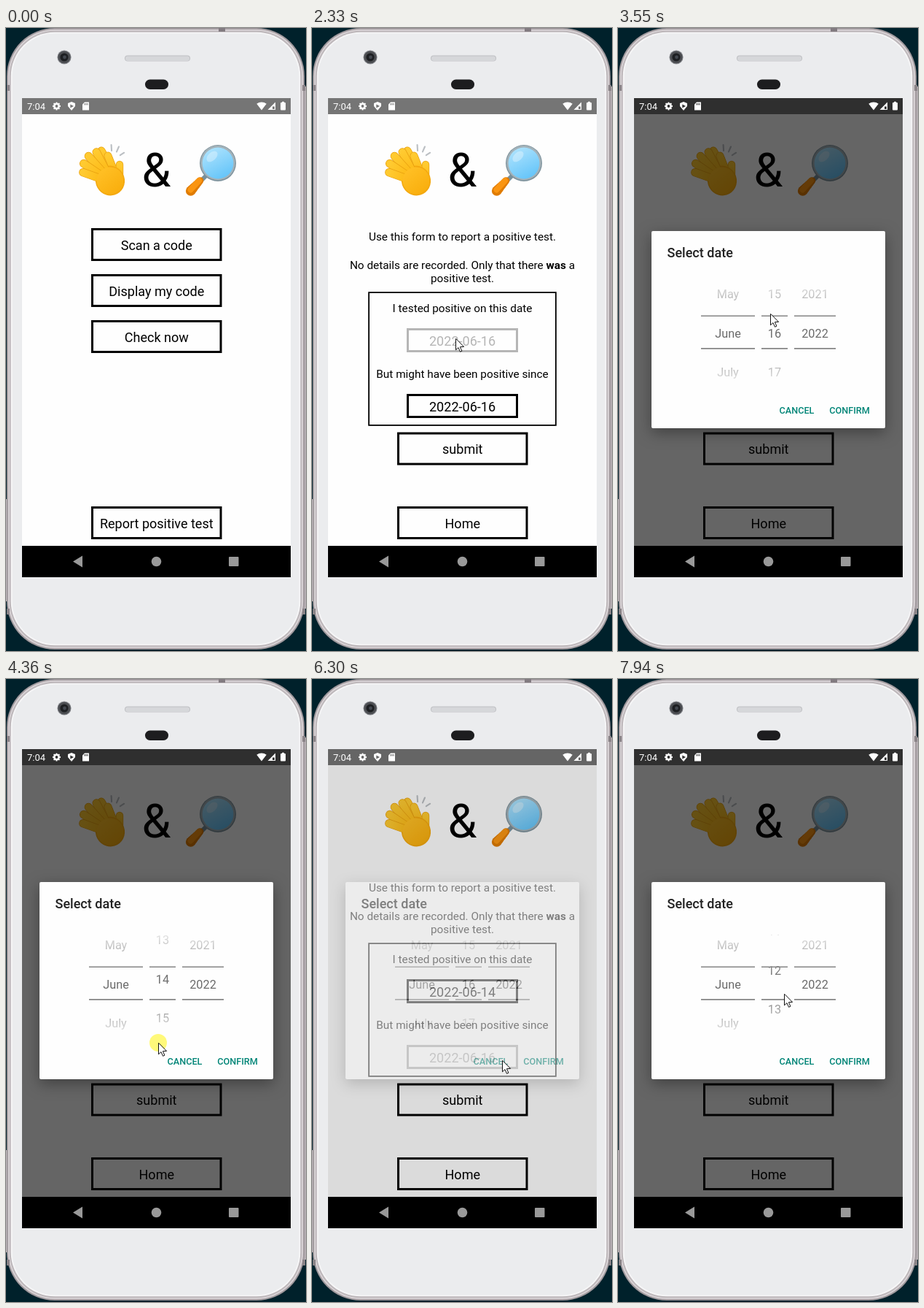
An HTML page with a canvas for the animation above (7.99 s loop, 412 by 853 pixels).

```html
<!DOCTYPE html>
<html lang="en">
<head>
<meta charset="utf-8">
<title>Report a positive test</title>
<style>
html, body { margin: 0; width: 100%; height: 100%; overflow: hidden; background: #00212b; }
canvas { display: block; width: 412px; height: 853px; }
</style>
</head>
<body>
<canvas id="stage" width="412" height="853"></canvas>
<script>
const LOOP = 7990, W = 412, H = 853;
const stage = document.getElementById('stage').getContext('2d');
const layer = document.createElement('canvas');
layer.width = W;
layer.height = H;
const sheet = layer.getContext('2d');
let c = stage;

// Pointer moves: from time, to time, x, y, sideways bow
const MOVES = [
  [160, 560, 236, 666], [1250, 2000, 197, 425], [2800, 3550, 209, 391, -42],
  [3630, 4360, 209, 498], [4440, 5110, 311, 522], [5580, 6080, 261, 522],
  [6420, 6840, 217, 393], [6970, 7750, 219, 582], [7780, 7940, 228, 431]
];
const PRESSES = [[600, 740], [2050, 2280], [3630, 4440], [5310, 5410], [6110, 6230], [6970, 7770]];
const FORM_AT = 790, STEP = 53.5, MID = 417.5, DAY = 16, SLOP = 8;

const clamp = v => Math.max(0, Math.min(1, v));
const smooth = v => v * v * (3 - 2 * v);
const span = (t, a, b) => clamp((t - a) / (b - a));

function pointer(t) {
  let x = 355, y = 812;
  for (const [from, to, px, py, bow = 0] of MOVES) {
    const k = smooth(span(t, from, to));
    x += (px - x) * k + bow * Math.sin(Math.PI * k);
    y += (py - y) * k;
  }
  return [x, y];
}

function touchOpacity(t, [down, up]) {
  if (t < up) return 1 - 0.8 * span(t, down, down + 50);
  return 0.2 + 0.8 * smooth(span(t, up, up + 250));
}

// Drag follows the pointer, then settles on a whole number of days
function wheelShift(t, y) {
  const second = t > 5900;
  const [down, up] = PRESSES[second ? 5 : 2];
  const top = second ? 393 : 390, low = second ? 582 : 498;
  if (t < down) return 0;
  if (t < up) return Math.max(0, y - top - SLOP);
  const last = low - top - SLOP, rest = Math.round(last / STEP + 0.3) * STEP;
  return rest - (rest - last) * (1 - span(t, up, up + 850)) ** 2.5;
}

function dialogLevel(t) {
  if (t < 5000) return span(t, 2335, 2465);
  if (t < 5900) return 1 - span(t, 5427, 5557);
  return span(t, 6271, 6401);
}

function box(x, y, w, h, r, fill) {
  c.beginPath();
  c.roundRect(x, y, w, h, r);
  c.fillStyle = fill;
  c.fill();
}

function oval(x, y, rx, ry, turn, fill) {
  c.beginPath();
  c.ellipse(x, y, rx, ry, turn, 0, 7);
  c.fillStyle = fill;
  c.fill();
}
const disc = (x, y, r, fill) => oval(x, y, r, r, 0, fill);

function poly(pts, fill) {
  c.beginPath();
  pts.forEach(p => c.lineTo(p[0], p[1]));
  c.closePath();
  c.fillStyle = fill;
  c.fill();
}

function line(x1, y1, x2, y2, w, color, cap = 'round') {
  c.beginPath();
  c.moveTo(x1, y1);
  c.lineTo(x2, y2);
  c.lineWidth = w;
  c.lineCap = cap;
  c.strokeStyle = color;
  c.stroke();
}

function text(s, x, y, size, fill = '#000', align = 'center', weight = 400) {
  c.font = `${weight} ${size}px Roboto, sans-serif`;
  c.textAlign = align;
  c.fillStyle = fill;
  c.fillText(s, x, y);
}

function fade(from, to, x1, y1, x2, y2) {
  const g = c.createLinearGradient(x1, y1, x2, y2);
  g.addColorStop(0, from);
  g.addColorStop(1, to);
  return g;
}

function frame(x, y, w, h, b) {
  c.lineWidth = b;
  c.strokeStyle = '#000';
  c.strokeRect(x + b / 2, y + b / 2, w - b, h - b);
}

function button(label, x, y, w, h, alpha = 1) {
  c.globalAlpha = alpha;
  frame(x, y, w, h, 3);
  text(label, x + w / 2, Math.round(y + h / 2 + 7.2), 18.05);
  c.globalAlpha = 1;
}
const wide = (label, y, alpha) => button(label, 117, y, 179.5, 45, alpha);
const dateButton = (label, y, alpha) => button(label, 130, y, 153, 33, alpha);

function phone() {
  box(0, 0, W, H, 0, '#00212b');
  box(0, 645, 6, 140, 0, '#b9b2b6');
  box(408, 80, 4, 715, 0, '#b4adb1');
  ['#a19a9e', '#d9d3d6', '#bdb7ba', '#f6f6f7', '#ebecee'].forEach((tone, i) => {
    const d = 1 + i * 1.9;
    box(d, d - 1, 411 - 2 * d, 853 - 2 * d, 67 - d, tone);
  });
  for (const x of [1, 407])
    for (const y of [78, 795]) box(x, y, 4, 8, 0, '#8b8488');
  box(292, 0, 9, 5, 0, '#827b80');

  disc(80, 40, 9.6, '#85878c');
  disc(80, 40, 8.6, '#4c4e52');
  disc(80, 40, 5.6, '#1d1f22');
  disc(80.5, 40, 2.4, '#42474e');
  box(163, 37.5, 90, 8, 4, '#bfc0c3');
  box(164, 38.5, 88, 6.5, 3, '#d6d7da');
  box(191, 70.5, 32, 13.5, 6.7, '#1d1d1f');
}

function statusIcons(back) {
  const white = '#fff';
  text('7:04', 29, 112, 13, white, 'left');
  for (let i = 0; i < 4; i++) {
    const a = i * Math.PI / 4, x = Math.cos(a) * 4.4, y = Math.sin(a) * 4.4;
    line(69.5 - x, 107 - y, 69.5 + x, 107 + y, 2.4, white);
  }
  disc(69.5, 107, 4.2, white);
  disc(69.5, 107, 1.9, back);
  poly([[90, 101], [95, 103], [95, 107], [90, 113], [85, 107], [85, 103]], white);
  poly([[88.3, 104.4], [93, 107], [88.3, 109.6]], back);
  poly([[108, 101.5], [114, 101.5], [114, 112.5], [105, 112.5], [105, 104.5]], white);
  for (let x = 107.5; x < 113; x += 2) box(x, 103, 1, 2.4, 0, back);

  c.beginPath();
  c.moveTo(351, 112.5);
  c.arc(351, 112.5, 11, -Math.PI * 0.71, -Math.PI * 0.29);
  c.fillStyle = white;
  c.fill();
  poly([[370, 101.5], [370, 112], [359.5, 112]], white);
  box(366, 107.5, 2.8, 3.5, 0, back);
  box(377, 102, 7, 10.5, 1, white);
  box(379, 100.8, 3, 2, 0, white);
}

function finger(x1, y1, x2, y2, w) {
  line(x1, y1, x2, y2, w + 1.4, '#e8a010');
  line(x1, y1, x2, y2, w, fade('#ffca30', '#fdb915', x1, y1, x2, y2));
}

function clap() {
  for (let i = 0; i < 3; i++) {
    const a = -1.65 + i * 0.6, x = Math.cos(a), y = Math.sin(a);
    line(146 + x * 12, 179 + y * 11, 146 + x * 18, 179 + y * 19, 2.1, '#bbbfc3');
  }
  for (let i = 0; i < 2; i++) finger(131 + i * 9, 168 + i * 7, 150, 200, 9.5);
  finger(156, 187, 156, 209, 9);
  oval(143, 209, 20, 20.5, -0.5, '#f3a80f');
  for (let i = 0; i < 4; i++) {
    const a = -2.05 - i * 0.25, r = 49 - (i - 1) ** 2 * 1.6;
    const x = Math.cos(a), y = Math.sin(a);
    finger(146 + x * r, 212 + y * r, 146 + x * 15, 212 + y * 15, 10);
  }
  oval(143, 209, 18.5, 18.5, -0.5, fade('#ffbf24', '#f9ae0d', 130, 196, 154, 226));
}

function lens() {
  line(275, 202, 268, 209, 6, '#78909c', 'butt');
  for (let i = 0; i < 9; i++) disc(266.5 - i * 1.6, 209 + i * 1.75, 4.8 + i * 0.25, '#e07c00');
  line(265, 209, 253.5, 221.5, 8, '#fa9511');
  disc(291, 185, 25, '#7d919b');
  disc(291, 184.6, 23.8, '#a3b2b9');
  disc(291, 185, 21.4, fade('#a9e1fd', '#66c5f9', 280, 167, 299, 205));
  oval(283, 176, 9, 5.5, -0.75, 'rgba(255,255,255,.33)');
}

function header() {
  clap();
  text('&', 206.5, 217, 64);
  lens();
}

function home(t) {
  ['Scan a code', 'Display my code', 'Check now'].forEach((s, i) => wide(s, 274 + i * 63));
  wide('Report positive test', 655, touchOpacity(t, PRESSES[0]));
}

function boldLine(y) {
  const parts = [['No details are recorded. Only that there ', 400], ['was', 700], [' a', 400]];
  const widths = parts.map(([s, w]) => {
    c.font = `${w} 15.35px Roboto, sans-serif`;
    return c.measureText(s).width;
  });
  let x = 206.5 - widths.reduce((a, b) => a + b) / 2;
  parts.forEach(([s, w], i) => {
    text(s, x, y, 15.35, '#000', 'left', w);
    x += widths[i];
  });
}

function form(t) {
  const note = (s, y) => text(s, 206.5, y, 15.35);
  note('Use this form to report a positive test.', 291);
  boldLine(330);
  note('positive test.', 348);
  frame(77.2, 361.2, 258.6, 183.6, 1.8);
  note('I tested positive on this date', 389);
  dateButton(t < 5420 ? '2022-06-16' : '2022-06-14', 411, touchOpacity(t, PRESSES[1]));
  note('But might have been positive since', 479);
  dateButton('2022-06-16', 501, touchOpacity(t, PRESSES[4]));
  wide('submit', 553.5);
  wide('Home', 655);
}

function dialog(shift) {
  c = sheet;
  c.clearRect(0, 0, W, H);
  c.shadowColor = 'rgba(0,0,0,.36)';
  c.shadowBlur = 20;
  c.shadowOffsetY = 6;
  box(46, 278, 321, 270, 2, '#fefefe');
  c.shadowColor = 'transparent';
  text('Select date', 67.5, 314, 18.05, '#212121', 'left', 500);

  const ink = c.createLinearGradient(0, 337, 0, 498);
  [0, 0.58, 0.58, 0].forEach((a, i) => ink.addColorStop([0, 0.45, 0.55, 1][i], `rgba(0,0,0,${a})`));
  const cell = (s, x, row, dy = 0) => text(s, x, MID + row * STEP + dy + 6, 16.25, ink);
  ['May', 'June', 'July'].forEach((m, i) => cell(m, 151, i - 1));
  for (const row of [-1, 0]) cell(2022 + row, 270.5, row);
  c.save();
  c.beginPath();
  c.rect(197, 350, 36, 134);
  c.clip();
  for (let row = -6; row < 3; row++) cell(DAY + row, 215, row, shift);
  c.restore();
  for (const [x, w] of [[114, 74], [197, 36], [242, 57]])
    for (const y of [393.4, 438]) box(x, y, w, 1.7, 0, '#858585');

  text('CANCEL', 245.5, 528, 12.63, '#008577', 'center', 500);
  text('CONFIRM', 318, 528, 12.63, '#008577', 'center', 500);
  c = stage;
}

function navBar() {
  box(22, 709, 369, 43, 0, '#000');
  poly([[92, 730.5], [105, 722.5], [105, 738.5]], '#999');
  disc(206.5, 730.5, 6.8, '#999');
  box(306, 724, 13.5, 13, 1, '#999');
}

function arrow(x, y, pressed) {
  if (pressed) disc(x, y, 12, 'rgba(255,247,70,.72)');
  c.save();
  c.translate(x, y);
  poly([[0.5, 0.5], [0.5, 15.8], [4, 12.6], [6.5, 18.3], [8.9, 17.2], [6.4, 11.7], [11.2, 11.4]], '#fff');
  c.lineWidth = 1;
  c.strokeStyle = '#111';
  c.stroke();
  c.restore();
}

function draw(t) {
  const [x, y] = pointer(t), level = dialogLevel(t);
  const closing = t > 5000 && t < 5900;
  const gray = Math.round(117 * (1 - 0.6 * level));
  phone();
  box(22, 96, 369, 656, 0, '#fefefe');
  box(22, 96, 369, 22, 0, '#757575');
  header();
  (t < FORM_AT ? home : form)(t);
  box(22, 96, 369, 613, 0, `rgba(0,0,0,${0.6 * level})`);
  statusIcons(`rgb(${gray},${gray},${gray})`);
  if (level > 0) {
    dialog(wheelShift(t, y));
    c.globalAlpha = clamp(closing ? 1 - (1 - level) * 2.12 : level * 2.15);
    c.drawImage(layer, 0, 0);
    c.globalAlpha = 1;
  }
  navBar();
  if (t >= 160) arrow(x, y, PRESSES.some(([a, b]) => t >= a && t < b));
}

const start = performance.now();
function tick() {
  draw((performance.now() - start) % LOOP);
  requestAnimationFrame(tick);
}
tick();
</script>
</body>
</html>
```
